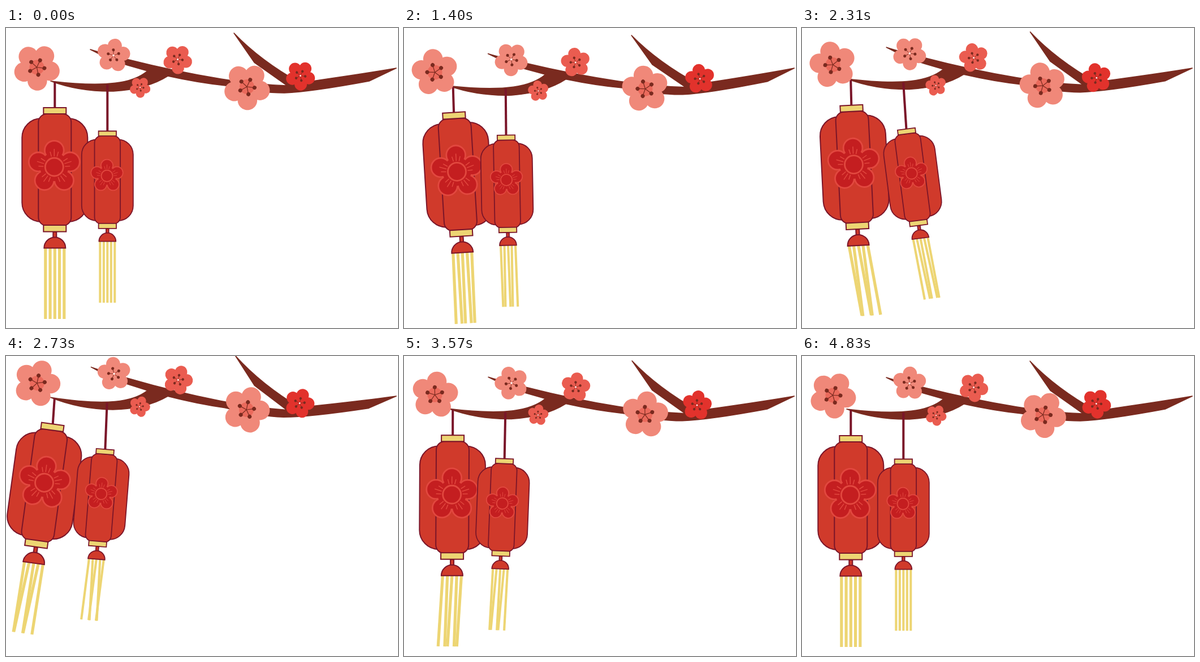
Animation, 693 px wide and 531 px high, one loop 4900 ms. Source, as an HTML page with a canvas:

```html
<!DOCTYPE html>
<html lang="en">
<head>
<meta charset="utf-8">
<title>Lanterns on a blossom branch</title>
<style>
  html, body { margin: 0; width: 100%; height: 100%; overflow: hidden; background: #fff; }
  canvas { display: block; }
</style>
</head>
<body>
<canvas id="stage" width="693" height="531"></canvas>
<script>
const ctx = document.getElementById('stage').getContext('2d');
const LOOP = 4900, STEP = 70, TAU = Math.PI * 2, DEG = Math.PI / 180;
const WOOD = '#7a2a1f', LINE = '#7a1529', RED = '#d03a2b', GOLD = '#edd573',
      CREST = '#c41e20', CREST_LINE = '#e2483f', PINK = '#f08879', CORAL = '#ea5c50';

const PIVOT = [690, 72];
const BRANCH = new Path2D(`M690 71 C620 83 560 91 520 97 Q450 58 403 9 L439 61 Q470 83 497 102
  Q440 100 380 90 Q300 77 217 56 Q175 46 149 38 Q185 57 215 66 L250 76
  C225 97 180 106 79 94 Q130 113 190 112 Q250 108 286 85 Q340 97 388 102
  Q450 115 492 115 Q540 113 642 94 Z`);

const BLOSSOMS = [
  { x: 54.5, y: 69.5, size: 1, color: PINK, heart: '#ea6a5c' },
  { x: 190, y: 48.5, size: .72, color: PINK, turn: 8 },
  { x: 303.5, y: 55.5, size: .63, color: CORAL },
  { x: 237, y: 105, size: .45, color: CORAL },
  { x: 426, y: 104, size: 1, color: PINK, heart: '#ea6a5c' },
  { x: 520.5, y: 87, size: .635, color: '#e2322c', lift: 2.5 },
];

// Each swing: start, right peak, left peak and end times, then both peak angles.
const BRANCH_SWING = [1080, 1800, 2700, 3690, 1.95, 1.95];
const LANTERNS = [
  { x: 86.3, y: 95, cord: 46, scale: 1, crestY: 105, crestScale: 1, strand: 125,
    swing: [1110, 1900, 2770, 3680, 11.8, 7.9],
    tassel: [[1150, 2080, 2960, 3900, 15, 13.5], [1150, 2000, 2800, 3850, 17.5, 13]] },
  { x: 179.3, y: 100, cord: 82.5, scale: .785, crestY: 101, crestScale: .8, strand: 138,
    swing: [1240, 2040, 3000, 3880, 10.8, 8],
    tassel: [[1180, 2060, 2980, 3880, 15.5, 12], [1240, 2160, 3080, 4050, 14, 11]] },
];

function swingAngle(t, [start, right, left, end, rightMax, leftMax]) {
  const ease = (a, b, from, to) => from + (to - from) * (1 - Math.cos(Math.PI * (t - a) / (b - a))) / 2;
  if (t <= start || t >= end) return 0;
  if (t < right) return ease(start, right, 0, rightMax) * DEG;
  if (t < left) return ease(right, left, rightMax, -leftMax) * DEG;
  return ease(left, end, -leftMax, 0) * DEG;
}

function placed(x, y, angle, draw) {
  ctx.save();
  ctx.translate(x, y);
  ctx.rotate(angle);
  draw();
  ctx.restore();
}

function disc(x, y, r, color) {
  ctx.fillStyle = color;
  ctx.beginPath();
  ctx.arc(x, y, r, 0, TAU);
  ctx.fill();
}

function box(x, y, w, h, r, fill) {
  ctx.beginPath();
  ctx.roundRect(x, y, w, h, r);
  ctx.fillStyle = fill;
  ctx.fill();
  ctx.stroke();
}

function ray(angle, from, to) {
  ctx.beginPath();
  ctx.moveTo(from * Math.sin(angle), -from * Math.cos(angle));
  ctx.lineTo(to * Math.sin(angle), -to * Math.cos(angle));
  ctx.stroke();
}

function petals(distance, r, color) {
  for (let i = 0; i < 5; i++) {
    const a = i * TAU / 5;
    disc(distance * Math.sin(a), -distance * Math.cos(a), r, color);
  }
  disc(0, 0, distance * .85, color);
}

function blossom({ x, y, size, color, heart, turn = 34, lift = 0 }, spin) {
  placed(x, y, spin, () => {
    ctx.translate(0, -lift);
    ctx.rotate(turn * DEG);
    ctx.scale(size, size);
    petals(24, 17.3, color);
    ctx.rotate(-9 * DEG);
    if (heart) disc(0, 0, 13, heart);
    else disc(0, 0, 2.2, '#fff');
    ctx.strokeStyle = WOOD;
    ctx.lineWidth = 1.2;
    for (let i = 0; i < 5; i++) {
      const a = i * TAU / 5;
      ray(a, heart ? 0 : 3, 13);
      disc(13.5 * Math.sin(a), -13.5 * Math.cos(a), 3.5, WOOD);
    }
  });
}

function crest() {
  petals(29.5, 18.3, CREST_LINE);
  petals(29.5, 15.5, CREST);
  ctx.strokeStyle = CREST_LINE;
  ctx.lineWidth = 1.5;
  for (let i = 0; i < 15; i++) ray((Math.floor(i / 3) * 72 + (i % 3 - 1) * 15) * DEG, 19, i % 3 === 1 ? 32 : 28);
  ctx.lineWidth = 2.8;
  ctx.beginPath();
  ctx.arc(0, 0, 16, 0, TAU);
  ctx.stroke();
}

function lantern(item, t) {
  const angle = swingAngle(t, item.swing), cordAngle = angle / 2;
  ctx.rotate(-cordAngle);
  ctx.fillStyle = LINE;
  ctx.fillRect(-2, 0, 4, item.cord);
  placed(0, item.cord, cordAngle - angle, () => {
    ctx.scale(item.scale, item.scale);
    for (let i = 0; i < 5; i++) {
      const bend = swingAngle(t, item.tassel[i % 2]) - angle;
      placed((i - 2) * 8.25, 248, -bend, () => {
        ctx.fillStyle = GOLD;
        ctx.fillRect(-2.6, 0, 5.2, item.strand + 1);
      });
    }
    ctx.strokeStyle = LINE;
    ctx.lineWidth = 2 / Math.sqrt(item.scale);
    box(-58, 19, 116, 183, 34, RED);
    box(-29, 11, 58, 198, 15, RED);
    box(-20, 0, 40, 11, 0, GOLD);
    box(-20, 208, 40, 11.5, 0, GOLD);
    box(-3, 220, 6, 11, 0, RED);
    ctx.beginPath();
    ctx.arc(0, 248.5, 19, Math.PI, TAU);
    ctx.closePath();
    ctx.fillStyle = RED;
    ctx.fill();
    ctx.stroke();
    placed(-1, item.crestY, 0, () => {
      ctx.scale(item.crestScale, item.crestScale);
      crest();
    });
  });
}

function draw(t) {
  ctx.fillStyle = '#fff';
  ctx.fillRect(0, 0, 693, 531);
  const tilt = swingAngle(t, BRANCH_SWING);
  placed(...PIVOT, -tilt, () => {
    ctx.translate(-PIVOT[0], -PIVOT[1]);
    ctx.fillStyle = ctx.strokeStyle = WOOD;
    ctx.lineWidth = 1.6;
    ctx.lineJoin = 'round';
    ctx.fill(BRANCH);
    ctx.stroke(BRANCH);
    ctx.lineJoin = 'miter';
    for (const item of LANTERNS) placed(item.x, item.y, tilt, () => lantern(item, t));
    for (const flower of BLOSSOMS) blossom(flower, t / LOOP * TAU);
  });
}

const began = performance.now();
function tick() {
  const t = (performance.now() - began) % LOOP;
  draw(Math.floor(t / STEP) * STEP);
  requestAnimationFrame(tick);
}
tick();
</script>
</body>
</html>
```
